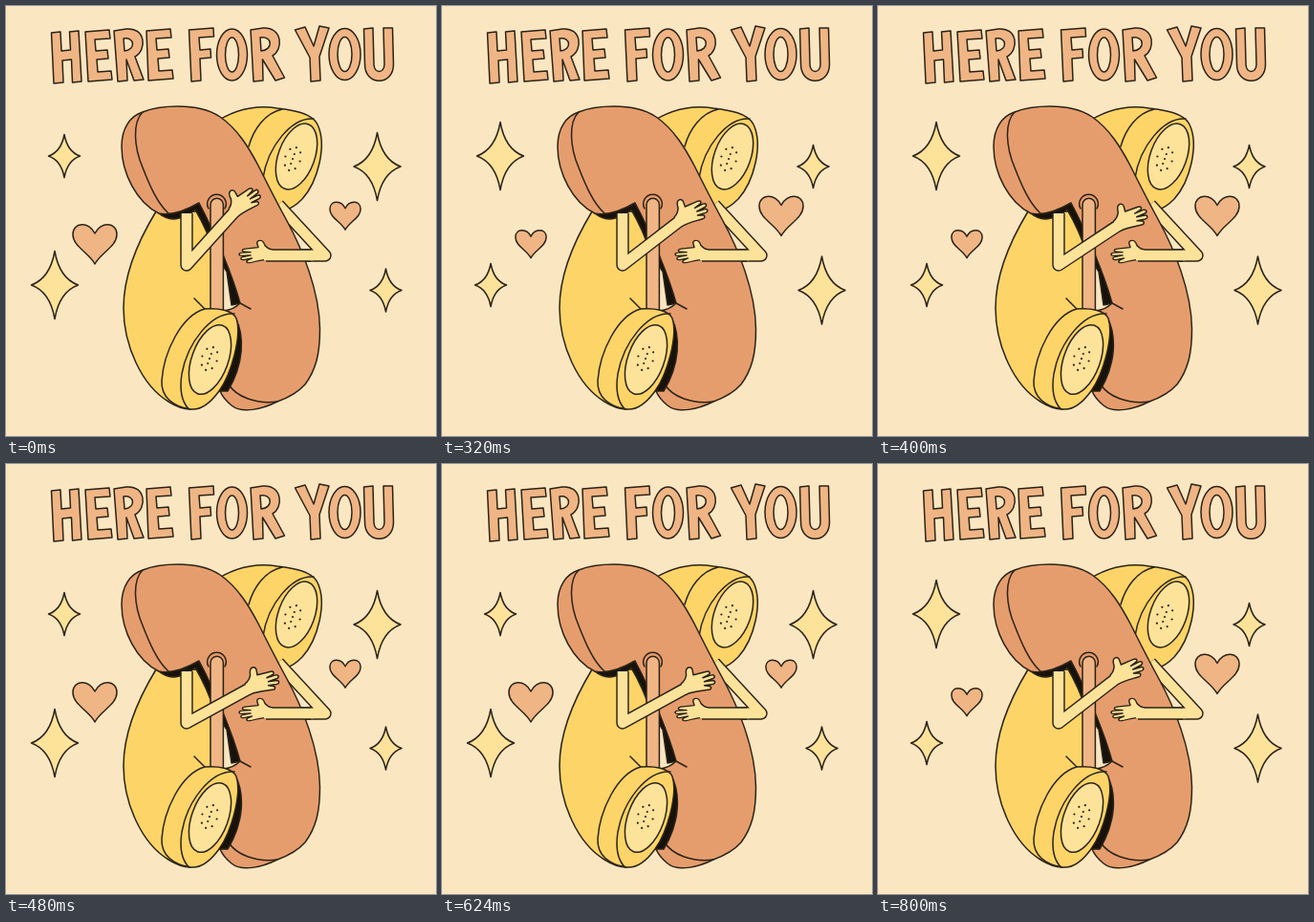
Write an HTML page that moves like this. It is 450x450 px and loops after 880 ms.

```html
<!DOCTYPE html>
<html lang="en">
<head>
<meta charset="utf-8">
<title>Here for you</title>
<style>
  html, body { margin: 0; width: 100%; height: 100%; overflow: hidden; background: #fbe6c2; }
  svg { display: block; width: 100vw; height: 100vh; }
  .ink { stroke: #2b2315; stroke-width: 1.5; stroke-linejoin: round; stroke-linecap: round; }
  .ink * { vector-effect: non-scaling-stroke; }
  .line { fill: none; }
  .salmon { fill: #e69d6d; }
  .gold { fill: #fdd467; }
  .pale { fill: #fde29a; }
  .peach { fill: #f0b585; }
  .dark { fill: #17120b; }
  .limb { fill: none; stroke-linejoin: round; }
  .edge { stroke: #2b2315; stroke-width: 13.4; }
  .core { stroke: #fde29a; stroke-width: 10.5; }
</style>
</head>
<body>
<svg viewBox="0 0 450 450" role="img" aria-label="HERE FOR YOU">
  <defs>
    <path id="hand" d="M-4 -6.2C0 -7 2 -9 4 -12C5 -16 6 -18 8 -18.6C11 -19.5 13 -17 12 -14L11 -9.5L25 -7.5C28.5 -7 28.5 -3.8 25.5 -3.6L19 -3L28.5 -2.2C32 -1.6 31.5 1.8 28.5 1.8L19 1.2L27.5 3.6C30.5 5 29 7.8 26 7.2L17.5 5L22 7.6C24.5 9.5 22.5 11.8 20 11C12 9 6 6.6 -4 6.2"/>
    <path id="heart" d="M0 21C-6 9 -23 3 -23 -10C-23 -23 -6 -24 0 -11C6 -24 23 -23 23 -10C23 3 6 9 0 21Z"/>
    <path id="star" d="M0 -1Q.2 -.2 1 0Q.2 .2 0 1Q-.2 .2 -1 0Q-.2 -.2 0 -1Z"/>
    <g id="holes"></g>
  </defs>

  <g class="ink peach" fill-rule="evenodd">
    <path d="M47.5 28L57 27L58 47L67.5 46L66.5 27L76 26L79 79L69.5 80L68.5 56L59 57L60 80L50 81Z"/>
    <path d="M83 27L108 25L109 34L93 35L94 47L106 46L107 55L95 56L96 69L110 68L111 77L86 79Z"/>
    <path d="M113 26L126 24C146 22 148 46 135 53L144 77L134 78L126 56L127 78L117 79ZM123 34L124 47C136 46 135 32 123 34Z"/>
    <path d="M147 26L172 24L173 33L157 34L158 46L170 45L171 54L159 55L160 68L174 67L175 76L149 78Z"/>
    <path d="M191.5 25L217 23L217.5 32L202 33L203 46L214 45L214.5 54L203 55L204 78L194 79Z"/>
    <path d="M220.5 51A16 27 0 0 1 252.5 51A16 27 0 0 1 220.5 51ZM229.5 51A7 18 0 0 0 243.5 51A7 18 0 0 0 229.5 51Z"/>
    <path d="M256 25L269 23C290 22 290 46 279 52L291.5 75L282 78L268.5 56L269 78L259 79ZM266 33L267 47C280 46 279 31 266 33Z"/>
    <path d="M302.5 25L313 22L322 42L328 21L338 23L328 53L329 78L319 79L318 54Z"/>
    <path d="M338 50.5A16.5 27 0 0 1 371 50.5A16.5 27 0 0 1 338 50.5ZM347 50.5A7.5 18 0 0 0 362 50.5A7.5 18 0 0 0 347 50.5Z"/>
    <path d="M374.5 24L384 23L385 61C385 71 396 71 396 61L395 23L404.5 23L405.5 61C405.5 84 375.5 84 375.5 61Z"/>
  </g>

  <g id="charms" class="ink"></g>

  <!-- rear handset, upper end -->
  <g class="ink">
    <path class="gold" d="M215 124C240 107 262 103 284 107C301 109 320 112 326 124C336 145 327 183 310 202C304 208 299 212 293 213L260 240L225 200Z"/>
    <path class="line" d="M289 108C271 112 259 129 254 147M322 118C299 116 274 147 269 180"/>
    <ellipse class="pale" cx="304" cy="157.5" rx="19" ry="36" transform="rotate(20 304 157.5)"/>
  </g>
  <use href="#holes" x="300" y="160"/>

  <path class="limb edge" d="M285 208L334 261H300"/>
  <path class="limb core" d="M285 208L334 261H300"/>

  <g class="ink">
    <path class="gold" d="M157 215C140 243 123 280 123 316C123 355 142 397 170 414C178 419 186 422 193 422L215 400L221 318L221 215Z"/>
    <path class="line" d="M197 306L208 317"/>
    <path class="dark" d="M160 217C166 222 174 224 181 222C188 221 194 217 198 213C208 230 214 245 218 258L231 278L236 313L246 311L226 240L201 206Z"/>
  </g>

  <!-- front handset -->
  <g class="ink">
    <path class="salmon" d="M143 111C155 106 167 105 180 105C197 105 212 108 224 116C243 129 255 150 264 167C274 187 283 205 293 223C310 254 328 298 328.5 338C328.5 365 324 381 313 396C305 405 295 410 284 414C268 422 247 427 236 418C230 413 226 408 224 403L235 330L228 319C236 318 241 315 245 311C238 285 220 240 202 206C190 213 175 220 160 217C137 206 121 175 121 147C121 128 130 115 143 111Z"/>
    <path class="line" d="M143 111C132 122 134 148 143 169C150 187 158 206 170 217M233 396C241 409 262 417 284 414M245 311L256 317"/>
    <path class="salmon" d="M212 212A9.8 9.8 0 1 1 229 212"/>
    <path class="peach" d="M214 320V208A6.7 6.7 0 0 1 227.4 208V320Z"/>
  </g>

  <!-- rear handset, lower end -->
  <g class="ink">
    <path class="dark" d="M240 326C250 345 249 375 232 403L222 403Z"/>
    <path class="gold" d="M208 317C222 316 237 318 241 327C247 345 236 385 223 403C212 418 201 424 191 421.5C176 419 162 410 163 392C165 363 183 324 208 317Z"/>
    <path class="line" d="M239 322C215 320 190 352 184 385C182 398 183 413 191 421.5"/>
    <ellipse class="pale" cx="213.5" cy="370" rx="19" ry="38" transform="rotate(20 213.5 370)"/>
  </g>
  <use href="#holes" x="213" y="369"/>

  <!-- still arm -->
  <path class="limb edge" d="M319 261H272"/>
  <use href="#hand" class="ink pale" transform="translate(275 260) scale(-1 .78)"/>
  <path class="limb core" d="M322 261H270"/>

  <!-- stroking arm -->
  <path id="armEdge" class="limb edge"/>
  <use id="palm" href="#hand" class="ink pale"/>
  <path id="armCore" class="limb core"/>
</svg>
<script>
  const $ = id => document.getElementById(id);
  const LOOP = 880;
  const ELBOW = [189, 271];

  // start time, arm angle in degrees, charm layout
  const STEPS = [
    [0, 45.8, 0], [320, 35.5, 1], [400, 31.3, 1],
    [480, 26.6, 0], [720, 31.3, 1], [800, 35.5, 1]
  ];

  // x, y, whether it is large in the first layout
  const STARS = [[61, 157, 0], [388.5, 168, 1], [51, 292, 1], [397.5, 297.5, 0]];
  const HEARTS = [[93, 249, 1], [355, 219.5, 0]];

  function add(parent, tag, attrs) {
    const el = document.createElementNS('http://www.w3.org/2000/svg', tag);
    for (const k in attrs) el.setAttribute(k, attrs[k]);
    return parent.appendChild(el);
  }

  // speaker holes: a tilted ring around a short row
  const hole = (x, y) => add($('holes'), 'circle', { cx: x, cy: y, r: 1.1, fill: '#2b2315' });
  for (let i = 0; i < 8; i++) {
    const a = i * Math.PI / 4, x = 8 * Math.cos(a), y = 12.5 * Math.sin(a);
    hole(x * .95 - y * .31, x * .31 + y * .95);
  }
  [[1.8, -5], [-1.8, 5], [0, 0]].forEach(p => hole(...p));

  const charm = (id, fill) => ([x, y, big]) =>
    ({ x, y, big, id, el: add($('charms'), 'path', { d: $(id).getAttribute('d'), class: fill }) });
  const charms = [...STARS.map(charm('star', 'pale')), ...HEARTS.map(charm('heart', 'peach'))];

  function placeCharms(layout) {
    for (const c of charms) {
      const large = c.big !== layout;
      const size = c.id === 'star' ? (large ? '24.5 35.5' : '16.5 22.5') : (large ? 1 : .7);
      c.el.setAttribute('transform', `translate(${c.x} ${c.y}) scale(${size})`);
    }
  }

  function placeArm(deg) {
    const [ex, ey] = ELBOW, a = -deg * Math.PI / 180;
    const path = (u, v) => {
      const x = ex + u * Math.cos(a) - v * Math.sin(a);
      const y = ey + u * Math.sin(a) + v * Math.cos(a);
      return `M${ex} 217V${ey}L${x} ${y}`;
    };
    $('armEdge').setAttribute('d', path(76, -3));
    $('armCore').setAttribute('d', path(80, -3));
    $('palm').setAttribute('transform',
      `translate(${ex} ${ey}) rotate(${-deg}) translate(77 -3) rotate(4)`);
  }

  let shown = null;
  function draw() {
    const t = performance.now() % LOOP;
    const step = STEPS.filter(s => s[0] <= t).pop();
    if (step !== shown) {
      placeArm(step[1]);
      placeCharms(step[2]);
      shown = step;
    }
    requestAnimationFrame(draw);
  }
  draw();
</script>
</body>
</html>
```
